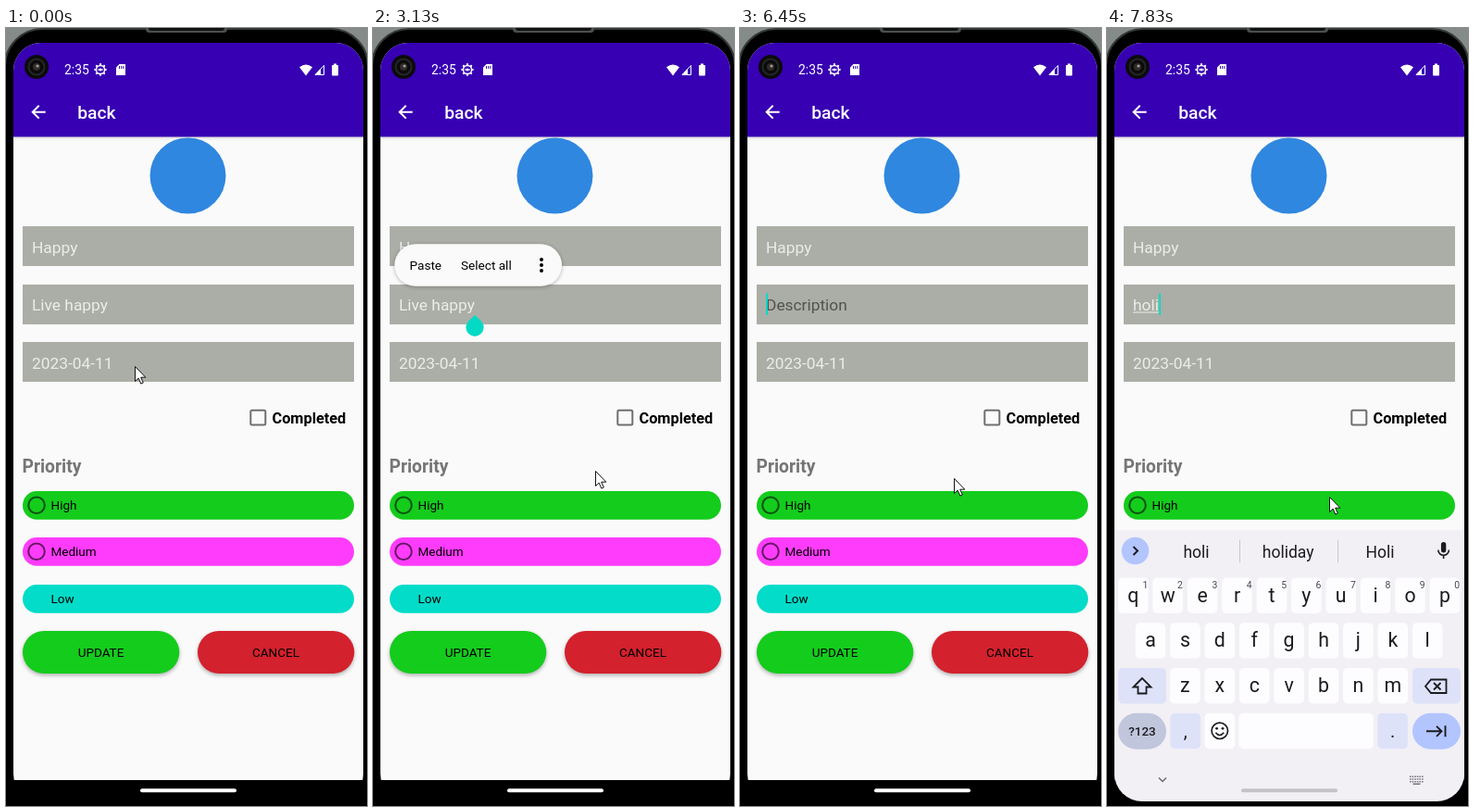
An HTML page with a canvas for the animation above (8000 ms loop, 390 by 840 pixels).

```html
<!DOCTYPE html>
<html lang="en">
<head>
<meta charset="utf-8">
<title>Edit task</title>
<style>
html, body { margin: 0; width: 100%; height: 100%; overflow: hidden; background: #000; }
canvas { display: block; }
</style>
</head>
<body>
<canvas id="stage" width="390" height="840"></canvas>
<script>
const ctx = document.getElementById('stage').getContext('2d');
const LOOP = 8000;
const TEAL = '#03dac5', PURPLE = '#3700b3', INK = '#1b1b1f';
const SCREEN_RADIUS = 30;

// Each entry overrides the state from its time (ms) onward.
const steps = [
  [0, { x: 139, y: 365, text: 'Live happy', caret: 0, handle: 0, popup: 0, keys: null, words: [] }],
  [120, { x: 148, y: 370 }],
  [240, { x: 160, y: 375 }],
  [390, { x: 182, y: 378 }],
  [510, { x: 200, y: 378 }],
  [630, { x: 190, y: 370 }],
  [750, { x: 169, y: 349 }],
  [900, { x: 155, y: 320 }],
  [1050, { x: 144, y: 299 }],
  [1480, { x: 124, y: 299 }],
  [1600, { x: 104, y: 299 }],
  [2000, { caret: 1, handle: 1 }],
  [2120, { x: 180, y: 370 }],
  [2270, { x: 239, y: 430 }],
  [2390, { x: 250, y: 465 }],
  [2540, { x: 250, y: 482, popup: 1 }],
  [2700, { x: 246, y: 486 }],
  [2980, { x: 243, y: 483, caret: 0 }],
  [3110, { x: 240, y: 478 }],
  [3250, { x: 237, y: 474 }],
  [3530, { caret: 1 }],
  [3680, { x: 236, y: 475 }],
  [4110, { text: 'Live happ', handle: 0 }],
  [4230, { text: 'Live hap' }],
  [4380, { popup: 0 }],
  [4650, { text: 'Live h' }],
  [4780, { text: 'Live' }],
  [4920, { text: 'Li' }],
  [5230, { text: 'L' }],
  [5360, { text: '', x: 235, y: 479 }],
  [5500, { x: 233, y: 481 }],
  [5900, { x: 232, y: 484, caret: 0 }],
  [6050, { x: 231, y: 486 }],
  [6450, { caret: 1 }],
  [7290, { text: 'ho', keys: 110, words: ['ho', 'home'] }],
  [7440, { text: 'hol', keys: 19 }],
  [7560, { keys: 2 }],
  [7710, { text: 'holi', keys: 0, words: ['holi', 'holiday', 'Holi'] }],
  [7830, { x: 240, y: 506 }]
];

function stateAt(t) {
  const state = {};
  for (const [time, change] of steps) if (time <= t) Object.assign(state, change);
  return state;
}

function box(x, y, w, h, r, color) {
  ctx.beginPath();
  ctx.roundRect(x, y, w, h, r);
  ctx.fillStyle = color;
  ctx.fill();
}

function dot(x, y, r, color) {
  ctx.beginPath();
  ctx.arc(x, y, r, 0, Math.PI * 2);
  ctx.fillStyle = color;
  ctx.fill();
}

function ring(x, y, r, color, width) {
  ctx.beginPath();
  ctx.arc(x, y, r, 0, Math.PI * 2);
  ctx.strokeStyle = color;
  ctx.lineWidth = width;
  ctx.stroke();
}

function label(str, x, y, size, color, weight = 400, align = 'left') {
  ctx.font = `${weight} ${size}px Roboto, sans-serif`;
  ctx.textAlign = align;
  ctx.fillStyle = color;
  ctx.fillText(str, x, y);
}

function line(path, color, width) {
  ctx.strokeStyle = color;
  ctx.lineWidth = width;
  ctx.stroke(new Path2D(path));
}

function shape(path, color) {
  ctx.fillStyle = color;
  ctx.fill(new Path2D(path));
}

function at(x, y, draw) {
  ctx.save();
  ctx.translate(x, y);
  draw();
  ctx.restore();
}

function withShadow(blur, dy, alpha, draw) {
  ctx.save();
  ctx.shadowColor = `rgba(0,0,0,${alpha})`;
  ctx.shadowBlur = blur;
  ctx.shadowOffsetY = dy;
  draw();
  ctx.restore();
}

function clipToScreen() {
  ctx.beginPath();
  ctx.roundRect(8, 16, 378, 819, SCREEN_RADIUS);
  ctx.clip();
}

function drawPhone() {
  ctx.fillStyle = '#858b88';
  ctx.fillRect(0, 0, 390, 840);
  box(-1, 1, 392, 880, 40, '#000');
  ctx.strokeStyle = '#343937';
  ctx.lineWidth = 2;
  ctx.stroke();
  box(151, -6, 88, 11, 4, '#4b504e');
  box(154, -6, 82, 9, 3, '#111');

  ctx.save();
  clipToScreen();
  box(8, 16, 378, 796, 0, '#fafafa');
  withShadow(3, 1, 0.15, () => box(8, 16, 378, 101.5, 0, PURPLE));
  ctx.restore();
  box(145, 821.3, 104, 4, 2, '#fff');

  dot(33, 42, 13, '#0b0b0b');
  ring(33, 42, 8.5, '#262626', 2);
  dot(33, 42, 4, '#302c2a');
  dot(34, 41, 1.6, '#a39a92');
}

function drawBars() {
  label('2:35', 63, 50, 13.9, '#fff');
  ring(102, 45, 4.6, '#fff', 1.5);
  for (let i = 0; i < 8; i++) {
    const a = i * Math.PI / 4;
    dot(102 + 5.8 * Math.cos(a), 45 + 5.8 * Math.sin(a), 1.1, '#fff');
  }
  dot(102, 45, 1.5, '#fff');
  line('M99 45H105', '#fff', 1);
  shape('M122.5 39H129V51H119V42.5Z', '#fff');
  line('M122.5 41V44M124.7 41V44M126.9 41V44', PURPLE, 1);
  shape('M324 51.5L317 42.2Q324 36.8 331 42.2Z', '#fff');
  line('M343.5 40.5V50.5H334Z', '#fff', 1);
  shape('M334 50.5L340 44V50.5Z', '#fff');
  box(352, 40, 7, 11.5, 1, '#fff');
  box(354, 38.5, 3, 2, 0, '#fff');

  line('M42.7 90.7H29.5M35.7 83.8L28.7 90.7L35.7 97.6', '#fff', 2);
  label('back', 77.2, 98, 19.25, '#fff', 500);
}

function drawForm(state) {
  const light = '#ececea';
  dot(196.5, 159.5, 41, '#2f87df');
  for (const y of [214, 277, 339]) box(18, y, 358, 43, 0, '#abaea6');
  label('Happy', 28, 242.5, 17.35, light);
  label('2023-04-11', 28, 367.5, 17.35, light);
  label(state.text || 'Description', 28, 305, 17.35, state.text ? light : '#51534f');
  const end = Math.round(28 + (state.text ? ctx.measureText(state.text).width : 0));
  if (state.keys !== null) box(28, 306.5, end - 28, 1, 0, light);
  if (state.caret) box(end, 286.5, 2, 23.5, 0, TEAL);
  if (state.handle) {
    at(end, 310, () => {
      dot(0, 13.3, 9.6, TEAL);
      shape('M0 0L6.8 6.5L0 13.3L-6.8 6.5Z', TEAL);
    });
  }

  ctx.beginPath();
  ctx.roundRect(264.3, 412.8, 16, 15.6, 1.5);
  ctx.strokeStyle = '#6f6f6f';
  ctx.lineWidth = 2;
  ctx.stroke();
  label('Completed', 287.5, 427, 16.3, '#000', 700);
  label('Priority', 17.5, 480, 19.3, '#757575', 700);

  [['High', '#14cc1c'], ['Medium', '#ff3cfc'], ['Low', '#03dcc8']].forEach(([name, color], i) => {
    const y = Math.round(500 + i * 50.3);
    box(18, y, 358, 30.7, 15.3, color);
    if (i < 2) ring(33, y + 15.2, 8.8, 'rgba(0,0,0,.6)', 2);
    label(name, 48.5, y + 20.4, 13.5, '#000');
  });

  [['UPDATE', 18, '#14cc1c'], ['CANCEL', 207, '#d3212d']].forEach(([name, x, color]) => {
    withShadow(4, 2, 0.3, () => box(x, 651, 169.3, 46, 23, color));
    label(name, x + 84.5, 679, 13.5, '#000', 400, 'center');
  });
}

function drawPopup() {
  withShadow(4, 1, 0.27, () => box(23.3, 233.3, 180.7, 45.5, 22.7, '#fafafa'));
  label('Paste', 39.5, 261, 13.6, '#000');
  label('Select all', 95, 261, 13.6, '#000');
  for (const y of [250, 256, 262]) dot(182, y, 2, '#000');
}

function drawKeyRow(letters, firstX, y) {
  [...letters].forEach((letter, i) => {
    const x = firstX + i * 37.4;
    box(x - 16.3, y, 32.6, 38.5, 5, '#fdfcfe');
    label(letter, x, y + 26, 21.3, INK, 400, 'center');
  });
}

function drawKeyboard({ keys, words }) {
  const soft = '#dde2f9', blue = '#b3c5ff';
  ctx.save();
  clipToScreen();
  ctx.fillStyle = '#f2f0f5';
  ctx.fillRect(8, 542 + keys, 378, 300);
  box(145, 821.3, 104, 4, 2, keys > 10 ? '#fff' : '#c3c2c7');
  ctx.translate(0, keys);

  dot(30.5, 564.5, 14.8, blue);
  line('M28.5 560L33 564.5L28.5 569', INK, 2);
  words.forEach((word, i) => label(word, 96.5 + i * 99.2, 571.5, 17.5, INK, 400, 'center'));
  const dividers = words.length === 2 ? [143, 248, 295] : [143, 249];
  for (const x of dividers) box(x, 553, 1, 24, 0, '#c7c6cd');
  box(360.9, 555, 5.4, 11.5, 2.7, INK);
  line('M357.8 563.5A5.8 5.8 0 0 0 369.4 563.5M363.6 569V573', INK, 1.6);

  drawKeyRow('qwertyuiop', 28.3, 593.5);
  for (let i = 0; i < 10; i++) {
    label((i + 1) % 10, 41.5 + i * 37.4, 604.7, 10.4, '#46464f', 400, 'center');
  }
  drawKeyRow('asdfghjkl', 47, 642.3);
  drawKeyRow('zxcvbnm', 84.4, 691);

  box(12, 691, 52, 38.5, 5, soft);
  line('M38 702L28.5 711.5H33.5V718.5H42.5V711.5H47.5Z', INK, 1.8);
  box(330, 691, 52, 38.5, 5, soft);
  line('M350 703.5H366.5V718H350L344 710.7ZM353 707L360.5 714.5M360.5 707L353 714.5', INK, 1.8);

  const y = 739.8;
  box(12, y, 52, 39, 19.5, '#c0c6dc');
  label('?123', 38, y + 24.5, 13.5, INK, 500, 'center');
  box(68.4, y, 32.6, 38.5, 5, soft);
  label(',', 84.7, y + 26, 20, INK, 400, 'center');
  box(105.5, y, 32.6, 38.5, 5, '#fdfcfe');
  ring(121.8, y + 19, 8.7, INK, 1.7);
  dot(118.6, y + 16.5, 1.4, INK);
  dot(125, y + 16.5, 1.4, INK);
  line(`M117.4 ${y + 21}Q121.8 ${y + 26.5} 126.2 ${y + 21}`, INK, 1.6);
  box(142.4, y, 145.3, 38.5, 5, '#fdfcfe');
  box(292.3, y, 32.6, 38.5, 5, soft);
  label('.', 308.6, y + 26, 20, INK, 400, 'center');
  box(330, y, 52, 39, 19.5, blue);
  line(`M345 ${y + 19.5}H361M356 ${y + 14}L361.5 ${y + 19.5}L356 ${y + 25}M365.5 ${y + 13.5}V${y + 25.5}`, INK, 1.9);

  line('M56 809.5L60 813.5L64 809.5', '#6c6b72', 1.5);
  for (let row = 0; row < 3; row++) {
    for (let col = 0; col < 6; col++) {
      box(327 + col * 2.6, 807.5 + row * 2.7, 1.6, 1.6, 0, '#77767d');
    }
  }
  box(330.5, 815.6, 8, 1.5, 0, '#77767d');
  ctx.restore();
}

function drawPointer(x, y) {
  at(x + 0.5, y + 0.5, () => {
    const arrow = 'M0 0V16L3.7 12.6L6.3 18.6L8.8 17.5L6.2 11.7H11.3Z';
    shape(arrow, '#fff');
    line(arrow, '#111', 1);
  });
}

function frame() {
  const state = stateAt(performance.now() % LOOP);
  drawPhone();
  drawBars();
  drawForm(state);
  if (state.popup) drawPopup();
  if (state.keys !== null) drawKeyboard(state);
  drawPointer(state.x, state.y);
  requestAnimationFrame(frame);
}
frame();
</script>
</body>
</html>
```
